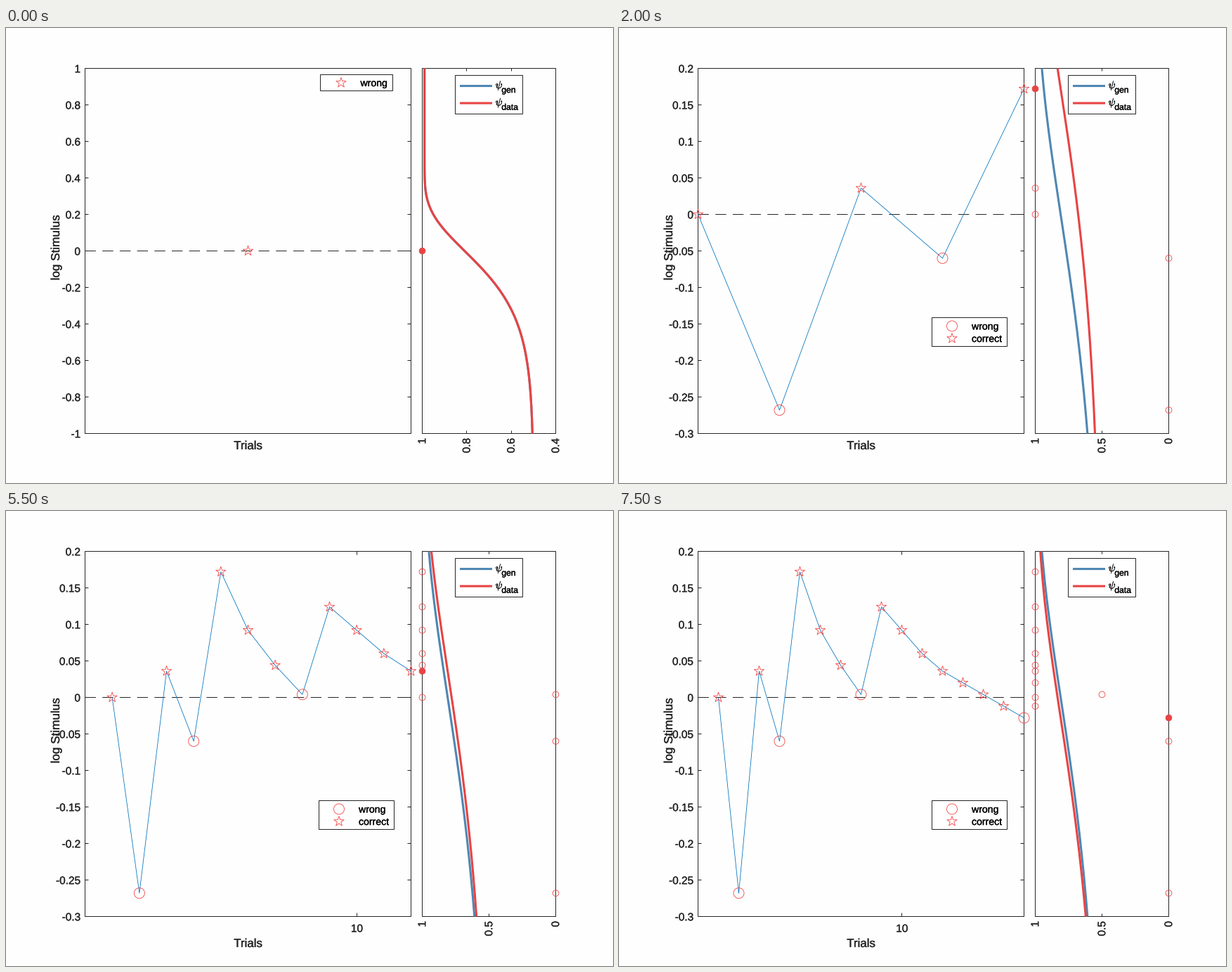
Write a matplotlib script that moves like this. It is 864 by 648 pixels and loops after 8000 ms.

```python
import numpy as np
import matplotlib.pyplot as plt
from matplotlib.animation import FuncAnimation
from matplotlib.patches import Circle, Polygon, Rectangle
from matplotlib.patheffects import Normal, Stroke

plt.rcParams["font.family"] = "Liberation Sans"
plt.rcParams["mathtext.fontset"] = "cm"
plt.rcParams["lines.scale_dashes"] = False
plt.rcParams["path.snap"] = False

W, H, DPI = 864, 648, 100
PT = 72 / DPI
L0, L1, R0, R1, TOP, BOT = 112.5, 576.5, 592.5, 782.5, 57.5, 577.5
INK, RED, BLUE, LINE = "#262626", "#e84444", "#4f87b3", "#0072bd"
MARK = "#f43c3c"
THIN = 0.8

STIM = np.array([0, -.268, .036, -.06, .172, .092, .044, .004,
                 .124, .092, .06, .036, .02, .004, -.012, -.028])
CORRECT = np.ones(len(STIM), bool)
CORRECT[[1, 3, 7, 15]] = False

fig = plt.figure(figsize=(W / DPI, H / DPI), dpi=DPI, facecolor="#fefefe")
ax = fig.add_axes([0, 0, 1, 1])


def psi(x, threshold):
    """Weibull psychometric function on a log axis."""
    return .5 + .49 * (1 - np.exp(-10 ** (2 * (x - threshold))))


def crisp(v):
    """Centre of the pixel that holds v."""
    return np.floor(v) + .5


def line(x, y, color=INK, lw=1.0, **kw):
    ax.plot(x, y, color=color, lw=lw * PT, solid_capstyle="butt", **kw)


def text(x, y, s, size, color=INK, ha="left", va="baseline", **kw):
    weight = [Stroke(linewidth=.3 * PT, foreground=color), Normal()]
    ax.text(x, y, s, fontsize=size * PT, color=color, ha=ha, va=va,
            path_effects=weight, **kw)


def box(x0, y0, x1, y1, z, fill="none"):
    ax.add_patch(Rectangle((x0, y0), x1 - x0, y1 - y0, fc=fill, ec=INK,
                           lw=PT, zorder=z))


def ring(x, y, r, z=5, fill="none"):
    ax.add_patch(Circle((x, y), r, fc=fill, ec=MARK if fill == "none" else fill,
                        lw=THIN * PT, zorder=z))


def star(x, y, r, z=5):
    a = np.arange(10) * np.pi / 5
    rad = np.where(np.arange(10) % 2, .382 * r, r)
    pts = np.column_stack([x + rad * np.sin(a), y - rad * np.cos(a)])
    ax.add_patch(Polygon(pts, fc="none", ec=MARK, lw=THIN * PT,
                         joinstyle="round", zorder=z))


def trial_mark(x, y, ok, z=5):
    (star if ok else ring)(x, y, 7.5, z)


def y_axis(n):
    if n == 1:
        return -1, 1, .2
    return -.3, (0 if n == 2 else .05 if n < 5 else .2), .05


def x_axis(n):
    if n == 1:
        return 0, 2
    if n <= 10:
        return 1, n
    return 0, (n + n % 2 if n < 15 else n)


def left_legend(n):
    if n == 1:
        box(447.5, 66.5, 550.5, 89.5, 8, "white")
        trial_mark(477, 78, True, 9)
        text(504.5, 83, "wrong", 14.1, "black", zorder=9)
        return
    if n == 2:
        top = 65.5
    else:
        top = 355.5 if n in (3, 4, 13, 14, 15) else 412.5
    box(445.5, top, 552.5, top + 41, 8, "white")
    for i, name in enumerate(("wrong", "correct")):
        y = top + 12 + 17.6 * i
        trial_mark(474, y, i == 1, 9)
        text(502, y + 5, name, 14.1, "black", zorder=9)


def right_legend():
    box(639.5, 67.5, 735.5, 122.5, 8, "white")
    for y, color, name in ((82.5, BLUE, "gen"), (107, RED, "data")):
        line([646, 692], [y, y], color, 3.1, zorder=9)
        text(696.5, y + 3.4, r"$\psi$", 15, "black", zorder=9)
        text(705.3, y + 9.6, name, 12.2, "black", zorder=9)


def draw(i):
    n = i + 1
    ax.clear()
    ax.set(xlim=(0, W), ylim=(H, 0))
    ax.axis("off")

    lo, hi, step = y_axis(n)
    xa, xb = x_axis(n)
    p_min = .4 if n == 1 else 0

    def to_y(v):
        return BOT - (np.asarray(v) - lo) / (hi - lo) * (BOT - TOP)

    def to_x(v):
        return L0 + (np.asarray(v) - xa) / (xb - xa) * (L1 - L0)

    def to_p(p):
        return R0 + (1 - np.asarray(p)) / (1 - p_min) * (R1 - R0)

    def x_tick(x, size):
        x = crisp(x)
        line([x, x], [BOT - size, BOT])
        line([x, x], [TOP, TOP + size])

    # Frames, ticks and labels
    box(L0, TOP, L1, BOT, 2)
    box(R0, TOP, R1, BOT, 2)
    for k in range(round((hi - lo) / step) + 1):
        v = round(lo + k * step, 2) + 0.0
        y = to_y(v)
        line([L0, L0 + 5], [crisp(y)] * 2)
        line([L1 - 5, L1], [crisp(y)] * 2)
        text(106, y + 5.8, f"{v:g}", 15.4, ha="right")
    for p in ((1, .8, .6, .4) if n == 1 else (1, .5, 0)):
        x = to_p(p)
        x_tick(x, 4)
        text(x + .7, 584, f"{p:g}", 15.4, ha="center", va="top", rotation=90)
    if n >= 10:
        x_tick(to_x(10), 5)
        text(to_x(10) + .3, 599.5, "10", 15.4, ha="center")
    text(344.7, 621 if n >= 10 else 600, "Trials", 16.9, ha="center")
    text(71.5, 312.5, "log Stimulus", 17.1, ha="center", va="center",
         rotation=90)

    # Trial history
    line([L0, L1], [crisp(to_y(0))] * 2, zorder=3, dash_capstyle="butt",
         linestyle=(0, (15.4 * PT, 9.3 * PT)))
    xs, ys = to_x(np.arange(1, n + 1)), to_y(STIM[:n])
    line(xs, ys, LINE, THIN, zorder=4)
    for x, y, ok in zip(xs, ys, CORRECT):
        trial_mark(x, y, ok)
    left_legend(n)

    # Psychometric curves, the estimate follows the latest stimulus
    s = np.linspace(lo, hi, 200)
    for color, a in ((BLUE, 0), (RED, STIM[i])):
        line(to_p(psi(s, a)), to_y(s), color, 3.1, zorder=4)
    for v in np.unique(STIM[:n]):
        rate = CORRECT[:n][STIM[:n] == v].mean()
        last = v == STIM[i]
        ring(to_p(rate), to_y(v), 4.4, 6 if last else 5,
             RED if last else "none")
    right_legend()
    return []


anim = FuncAnimation(fig, draw, frames=len(STIM), interval=500, repeat=True,
                     repeat_delay=0)
plt.show()
```
